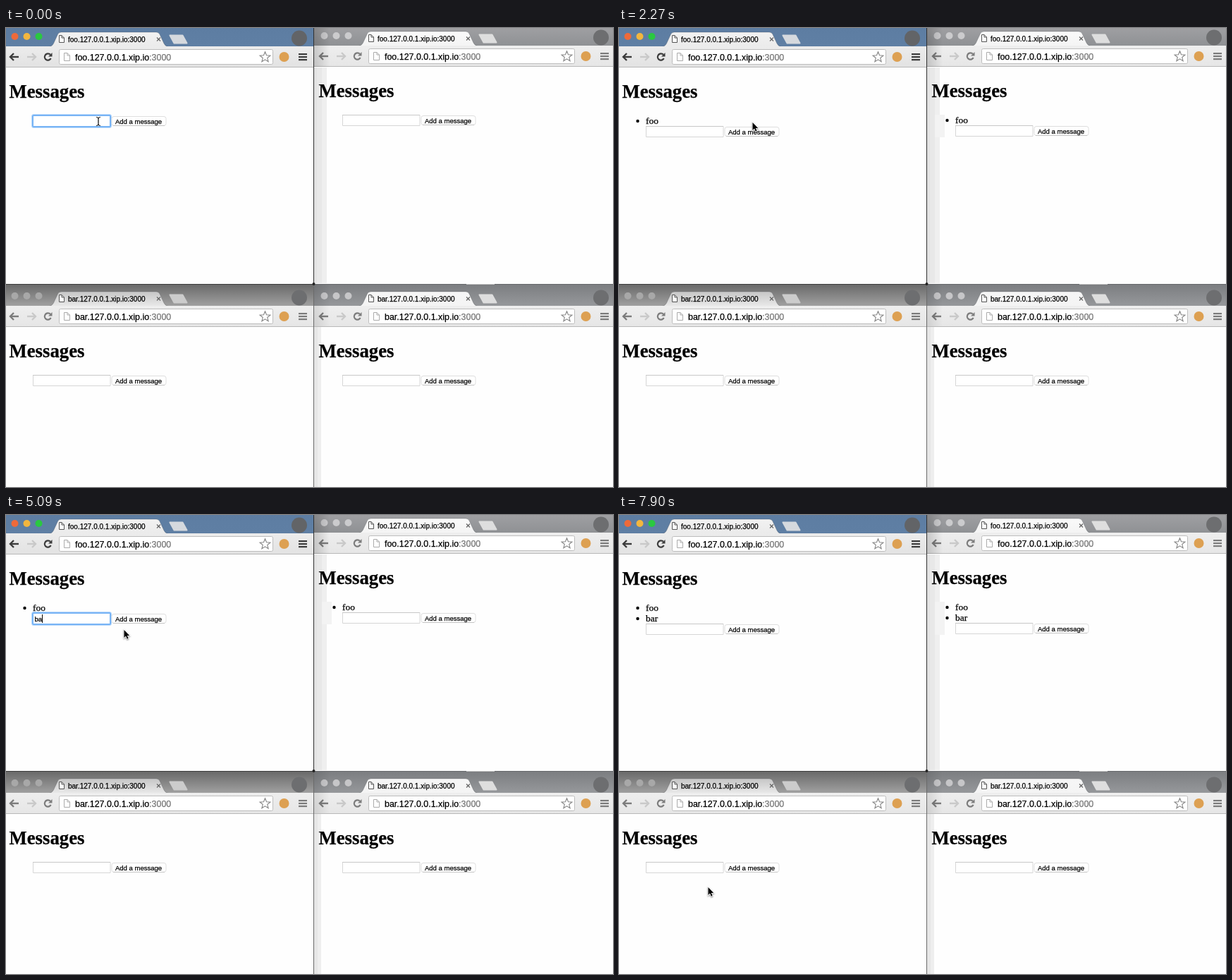
An HTML page with a canvas that plays this animation: 861 px wide and 651 px high, repeating every 8 s.

```html
<!DOCTYPE html>
<html lang="en">
<head>
<meta charset="utf-8">
<title>Messages</title>
<style>
  html, body { margin: 0; width: 100%; height: 100%; overflow: hidden; background: #fff; }
  canvas { display: block; }
</style>
</head>
<body>
<canvas id="stage" width="861" height="651"></canvas>
<script>
const ctx = document.getElementById("stage").getContext("2d");
const LOOP = 8000;
const SANS = '"Liberation Sans", Arial, sans-serif';
const SERIF = '"Liberation Serif", Times, serif';
const LINE = 15;

// "shift" moves the right-aligned parts of the narrower windows.
const windows = [
  { x: 439, y: -1, host: "foo", shift: -11, bar: ["#a2a2a5", "#8f9194"], tab: ["#fafafa", "#f4f4f4"],
    plus: "#dedede", lights: "#cbcbcd", mark: "#6d6e70" },
  { x: 0, y: 368, host: "bar", shift: 0, bar: ["#6a6a6a", "#a0a0a0"], tab: ["#c6c6c6", "#e8e8e8"],
    plus: "#cccccc", lights: "#a8a8a8", mark: "#6d6e70" },
  { x: 439, y: 368, host: "bar", shift: -11, bar: ["#7c7e81", "#96989b"], tab: ["#f6f6f6", "#f4f4f4"],
    plus: "#dedede", lights: "#c6c6c8", mark: "#6d6e70" },
  { x: 0, y: 0, host: "foo", shift: 0, bar: ["#5d7da2", "#5f7fa4"], tab: ["#f2f2f2", "#ebebeb"],
    plus: "#d5d9de", mark: "#626467", active: true }
];

// Timeline: each entry changes part of the state at its time.
const start = {
  text: "", focus: true, caret: false, click: false,
  x: 131, y: 132, left: [], right: []
};
const timeline = [];
const at = (time, change) => timeline.push({ time, change });

function glide(first, last, count, from, via, to) {
  for (let k = 1; k <= count; k++) {
    const p = k / count, t = p * p * (3 - 2 * p), u = 1 - t;
    const mix = i => u * u * from[i] + 2 * u * t * via[i] + t * t * to[i];
    at(first + (last - first) * (k - 1) / (count - 1), { x: mix(0), y: mix(1) });
  }
}

at(300, { text: "f", caret: true });
at(450, { text: "fo" });
at(620, { text: "foo" });
at(1070, { caret: false });
glide(1070, 1820, 6, [131, 132], [170, 151], [189, 133]);
at(1670, { caret: true });
at(2120, { text: "", focus: false, caret: false, click: true, right: ["foo"] });
at(2270, { click: false, left: ["foo"] });
glide(3020, 3600, 5, [189, 133], [150, 142], [107, 148]);
at(3600, { click: true, focus: true });
at(3750, { click: false, caret: true });
at(4200, { caret: false });
at(4350, { text: "b", caret: true });
at(4650, { text: "ba" });
glide(4800, 5090, 3, [107, 148], [150, 152], [167, 162]);
at(5240, { text: "bar" });
glide(5240, 5680, 4, [167, 162], [171, 185], [182, 147]);
at(5830, { caret: false });
at(6270, { text: "", focus: false, click: true, right: ["foo", "bar"] });
at(6420, { click: false, left: ["foo", "bar"] });
glide(6560, 6710, 2, [182, 147], [186, 148], [189, 147]);
glide(7160, 7900, 6, [189, 147], [180, 330], [126, 527]);
timeline.sort((a, b) => a.time - b.time);

function stateAt(time) {
  const state = { ...start };
  for (const step of timeline) {
    if (step.time > time + 0.5) break;
    Object.assign(state, step.change);
  }
  return state;
}

// Drawing helpers
function rect(x, y, w, h, fill) {
  ctx.fillStyle = fill;
  ctx.fillRect(x, y, w, h);
}

function shade(y0, y1, [top, bottom]) {
  const g = ctx.createLinearGradient(0, y0, 0, y1);
  g.addColorStop(0, top);
  g.addColorStop(1, bottom);
  return g;
}

function paint(fill, stroke, width = 1) {
  if (fill) { ctx.fillStyle = fill; ctx.fill(); }
  if (stroke) { ctx.strokeStyle = stroke; ctx.lineWidth = width; ctx.stroke(); }
}

function round(x, y, w, h, r, fill, stroke, width) {
  ctx.beginPath();
  ctx.roundRect(x, y, w, h, r);
  paint(fill, stroke, width);
}

function disc(x, y, r, fill, stroke, width) {
  ctx.beginPath();
  ctx.arc(x, y, r, 0, Math.PI * 2);
  paint(fill, stroke, width);
}

function shape(points, fill, stroke, width, open) {
  ctx.beginPath();
  points.forEach(([x, y]) => ctx.lineTo(x, y));
  if (!open) ctx.closePath();
  paint(fill, stroke, width);
}

// A hairline stroke gives the text its slightly heavy weight.
function write(text, x, y, font, color = "#000") {
  ctx.font = font;
  ctx.fillStyle = ctx.strokeStyle = color;
  ctx.lineWidth = 0.25;
  ctx.fillText(text, x, y);
  ctx.strokeText(text, x, y);
  return x + ctx.measureText(text).width;
}

function pageIcon(x, y, w, h, color) {
  const fold = 3.5;
  shape([[x, y], [x + w - fold, y], [x + w, y + fold], [x + w, y + h], [x, y + h]], "#fff", color);
  shape([[x + w - fold, y], [x + w - fold, y + fold], [x + w, y + fold]], null, color, 1, true);
}

function arrowIcon(x, y, dir, color) {
  shape([[x + dir * 6, y], [x - dir * 6, y]], null, color, 2.4, true);
  shape([[x - dir, y - 5], [x - dir * 6, y], [x - dir, y + 5]], null, color, 2.4, true);
}

function reloadIcon(x, y, color) {
  ctx.beginPath();
  ctx.arc(x, y, 4.6, 0.45, Math.PI * 1.75);
  paint(null, color, 2.2);
  shape([[x + 6, y - 6], [x + 6, y - 0.5], [x + 0.5, y - 0.5]], color);
}

function star(x, y) {
  const points = [];
  for (let i = 0; i < 10; i++) {
    const a = -Math.PI / 2 + i * Math.PI / 5, r = i % 2 ? 3.4 : 7.8;
    points.push([x + r * Math.cos(a), y + 0.5 + r * Math.sin(a)]);
  }
  shape(points, "#fff", "#858585", 1.1);
}

function titleBar({ shift, active, host, bar, tab, plus, lights, mark }) {
  rect(-2, -4, 440, 30, shade(-4, 26, bar));
  const colors = active ? ["#ee6a3a", "#f3b63e", "#2ac840"] : Array(3).fill(lights);
  colors.forEach((color, i) => disc(12.5 + 17 * i, 12, 5, color));

  // Plain disc in place of the browser mark
  disc(416 + shift, 14.5, 11, mark);

  ctx.beginPath();
  ctx.moveTo(61, 26.5);
  ctx.quadraticCurveTo(65.5, 26, 67.5, 22);
  ctx.lineTo(73.5, 9);
  ctx.quadraticCurveTo(75, 6, 78.5, 6);
  ctx.lineTo(213, 6);
  ctx.quadraticCurveTo(216.5, 6, 218, 9);
  ctx.lineTo(224, 22);
  ctx.quadraticCurveTo(226, 26, 230, 26.5);
  paint(shade(6, 26, tab), "rgba(50,55,60,.3)", 0.8);

  ctx.lineJoin = "round";
  shape([[232.5, 10.5], [250.5, 10.5], [256.5, 21.5], [238.5, 21.5]], plus, plus, 2);
  ctx.lineJoin = "miter";

  pageIcon(75.5, 10.5, 7, 10, "#555");
  write(host + ".127.0.0.1.xip.io:3000", 88, 19.5, "10px " + SANS);
  shape([[214, 13.5], [219, 18.5]], null, "#666", 1.2, true);
  shape([[219, 13.5], [214, 18.5]], null, "#666", 1.2, true);
}

function toolBar({ shift, active, host }) {
  const ink = active ? "#3c3c3c" : "#7c7c7c";
  rect(-2, 26, 440, 30, shade(26, 56, active ? ["#ececec", "#e2e2e2"] : ["#eeeeee", "#e6e6e6"]));
  rect(-2, 55, 440, 1, "#b8b8b8");
  arrowIcon(12, 41, 1, ink);
  arrowIcon(36, 41, -1, "#c9c9c9");
  reloadIcon(59.5, 41, ink);
  round(75.5, 30.5, 303 + shift, 21, 2, "#fff", "#bdbdbd");
  pageIcon(82.5, 35.5, 8, 11, "#ababab");
  const end = write(host + ".127.0.0.1.xip.io", 98, 45.5, "12.45px " + SANS);
  write(":3000", end, 45.5, "12.45px " + SANS, "#777");
  star(367.5 + shift, 41);
  disc(394.5 + shift, 41, 7, "#dda052");
  for (let i = -1; i <= 1; i++) rect(415 + shift, 40 + i * 4, 12, 2.2, ink);
}

function form(y, text, focus, caret) {
  if (focus) {
    round(37.5, y - 0.5, 111, 17, 2, "#fff", "#b9d9fb", 3);
    round(38, y, 110, 16, 1, "#fff", "#78b4f5", 2);
  } else {
    round(38.5, y + 0.5, 109.5, 15, 0, "#fff", "#d6d6d6");
    rect(38, y, 110, 1, "#c8c8c8");
  }
  const end = write(text, 40.5, y + 11.7, "9.5px " + SANS);
  if (caret) rect(Math.round(end), y + 2, 1, 12, "#000");
  round(150, y + 1.5, 77, 13, 3, "#fff", "#dedede");
  rect(152, y + 14, 73, 1, "#c4c4c4");
  write("Add a message", 155, y + 11.7, "9.5px " + SANS);
}

function page(items, text, focus, caret) {
  write("Messages", 4.5, 98.5, "bold 26.75px " + SERIF);
  items.forEach((item, i) => {
    disc(26.5, 132 + LINE * i, 2.2, "#000");
    write(item, 38, 135.7 + LINE * i, "13.4px " + SERIF);
  });
  form(124 + LINE * items.length, text, focus, caret);
}

function pageShadows(rows) {
  const bands = [[437, 4, "#e2e2e2"], [441, 7, "#e8e8e8"], [448, 7, "#efefef"]];
  bands.forEach(([x, w, color]) => rect(x, 56, w, 306, color));
  if (rows) rect(448, 123, 14, 17 + LINE * rows, "#f3f3f3");
  rect(437, 424, 5, 227, "#e6e6e6");
  rect(442, 424, 5, 227, "#eeeeee");
}

// Soft shade that the left-hand windows cast on the bars beside them
function barShadow(y, h, alpha) {
  const g = ctx.createLinearGradient(437, 0, 459, 0);
  g.addColorStop(0, `rgba(0,0,0,${alpha})`);
  g.addColorStop(1, "rgba(0,0,0,0)");
  rect(437, y, 22, h, g);
}

function drawWindow(win, state) {
  const left = win.x ? 437 : 0, top = win.y > 0 ? 364 : 0;
  ctx.save();
  ctx.beginPath();
  ctx.rect(left, top, win.x ? 424 : 436, win.y > 0 ? 287 : 363);
  ctx.clip();
  ctx.translate(win.x, win.y);
  titleBar(win);
  toolBar(win);
  const items = win.host === "bar" ? [] : win.active ? state.left : state.right;
  if (win.active) page(items, state.text, state.focus, state.caret);
  else page(items, "", false, false);
  ctx.restore();
}

function pointer({ x, y, click, left }) {
  const fieldY = 124 + LINE * left.length;
  const beam = x > 38 && x < 148 && y > fieldY && y < fieldY + 15;
  if (click) disc(x + (beam ? 0 : 2), y + (beam ? 0 : 1), 8.8, null, "#222", 1.3);
  ctx.save();
  ctx.translate(Math.round(x), Math.round(y));
  if (beam) {
    rect(-0.6, -5, 1.2, 11, "#000");
    rect(-0.6, 2, 1.2, 1, "#777");
    for (const side of [-1, 1]) {
      shape([[0, -4.5], [side * 2.8, -5.6]], null, "#000", 1, true);
      shape([[0, 5.5], [side * 2.8, 6.6]], null, "#000", 1, true);
    }
  } else {
    const tip = [[0.5, 1], [0.5, 12], [3, 9.6], [4.8, 13.8], [6.6, 13], [4.8, 9], [8.2, 9]];
    ctx.shadowColor = "rgba(0,0,0,.4)";
    ctx.shadowBlur = 2;
    ctx.shadowOffsetY = 1;
    shape(tip, "#fff", "#fff", 1.6);
    ctx.shadowColor = "transparent";
    shape(tip, "#000");
  }
  ctx.restore();
}

function draw(time) {
  const state = stateAt(time);
  rect(0, 0, 861, 651, "#fefefe");
  pageShadows(state.right.length);
  windows.forEach(win => drawWindow(win, state));
  barShadow(0, 55, 0.16);
  barShadow(364, 59, 0.1);

  // Seams between the windows
  rect(436, 0, 1, 363, "#303030");
  rect(436, 364, 1, 287, "#6a6a6a");
  rect(0, 363, 437, 1, "#3c3c3c");
  rect(437, 363, 424, 1, "#66686b");
  rect(653, 363, 40, 1, "#c4c4c4");
  disc(436.5, 363, 2, "#222");

  pointer(state);
}

function tick() {
  draw(performance.now() % LOOP);
  requestAnimationFrame(tick);
}
tick();
</script>
</body>
</html>
```
